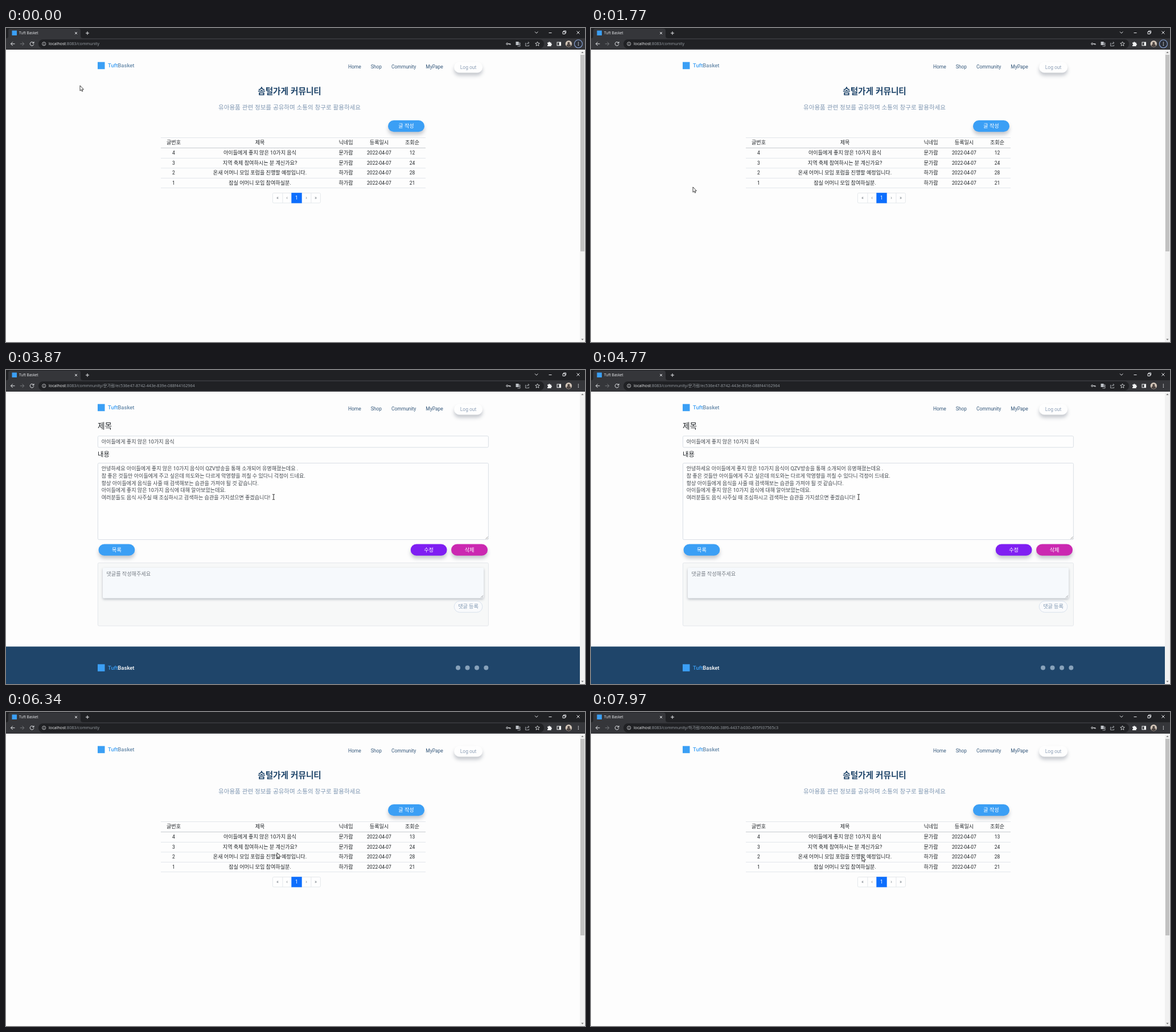
An HTML page that plays this animation: 1017x551 px, repeating every 8 s.

```html
<!DOCTYPE html>
<html lang="ko">
<head>
<meta charset="utf-8">
<style>
html, body { margin: 0; width: 100%; height: 100%; overflow: hidden; background: #fdfdfd; }
svg { display: block; font-family: Roboto, "Noto Sans CJK KR", "Noto Sans CJK", sans-serif; }
.ui { font-family: "Open Sans", "Noto Sans CJK KR", "Noto Sans CJK", sans-serif; }
.kr { font-family: "Noto Sans CJK KR", "Noto Sans CJK", sans-serif; }
.lift { filter: drop-shadow(0 5px 3px rgba(20, 35, 60, .24)); }
.soft { filter: drop-shadow(0 2px 2px rgba(20, 35, 60, .28)); }
.icon { fill: none; stroke: #e8eaed; stroke-width: 1; }
</style>
</head>
<body>
<svg id="stage" width="1017" height="551"></svg>
<script>
const BLUE = '#3b9ff5', INK = '#212529', NAVY = '#1f456a', SLATE = '#7f97b2';

const rect = (x, y, w, h, fill, more = '') =>
  `<rect x="${x}" y="${y}" width="${w}" height="${h}" fill="${fill}" ${more}/>`;
const dot = (x, y, r, fill, more = '') => `<circle cx="${x}" cy="${y}" r="${r}" fill="${fill}" ${more}/>`;
const icon = (d, more = '') => `<path class="icon" d="${d}" ${more}/>`;
// y is the optical middle of the line
const text = (x, y, str, size = 9.1, fill = INK, more = '') =>
  `<text x="${x}" y="${y + size * .36}" font-size="${size}" fill="${fill}" ${more}>${str}</text>`;
const MID = 'text-anchor="middle"';
const mid = (x, y, str, size, fill, more = '') => text(x, y, str, size, fill, MID + ' ' + more);
const pill = (x, y, w, h, fill, label, id = '') =>
  rect(x, y, w, h, fill, `rx="${h / 2}" class="lift" ${id && `id="${id}"`}`) +
  mid(x + w / 2, y + h / 2, label, 9.1, '#fff', 'font-weight="500"');
const field = (x, y, w, h, fill = '#fefefe', more = 'stroke="#d0d7df"') =>
  rect(x, y, w, h, fill, `rx="2" stroke-width=".8" ${more}`);
const grip = (x, y) => icon(`M${x - 4} ${y}l4 -4M${x - 1.5} ${y}l1.5 -1.5`, 'style="stroke:#777;stroke-width:.7"');
const brand = (y, color) => rect(161, y - 6, 12.5, 12.5, BLUE) +
  text(179, y, `<tspan fill="${BLUE}">Tuft</tspan>Basket`, 9.53, color, 'font-weight="500"');

function browser() {
  return rect(0, 0, 1017, 38, '#35363a') + rect(0, 0, 1017, 18, '#202124') +
    '<path d="M1 18Q4 18 4 14V5Q4 1 8 1H127Q131 1 131 5V14Q131 18 135 18Z" fill="#35363a"/>' +
    rect(10.5, 4.5, 8.5, 8.5, BLUE) +
    text(23, 9, 'Tuft Basket', 6.5, '#e8eaed', 'class="ui"') +
    icon('M121 7l4 4m0 -4l-4 4M140 9h6m-3 -3v6') +
    icon('M929 6.5l2.7 2.7 2.7 -2.7M953.5 8.5h5M978 6.5h4v4h-4zM979.5 6.5v-1.5h4v4h-1.5M1002.5 5.5l5 5m0 -5l-5 5', 'stroke-width=".8"') +
    rect(57, 20, 888, 16, '#202124', 'rx="8"') +
    icon('M15.5 27.8h-7m3.3 -3.3l-3.3 3.3 3.3 3.3') +
    icon('M24.8 27.8h7m-3.3 -3.3l3.3 3.3 -3.3 3.3', 'style="stroke:#77797d"') +
    icon('M48 25.6a3.3 3.3 0 1 0 .8 2.7M49 24v2.5h-2.6') +
    icon('M63.6 27.8a3.1 3.1 0 1 0 6.2 0a3.1 3.1 0 1 0 -6.2 0M66.7 27.3v2.3M66.7 25.8v.8', 'style="stroke-width:.75"') +
    '<text class="ui" x="75" y="30.2" font-size="7.2" fill="#9aa0a6"><tspan fill="#f1f3f4">localhost</tspan><tspan id="path"></tspan></text>' +
    dot(880.3, 27.8, 1.5, 'none', 'stroke="#e8eaed"') + icon('M882 27.8h4v1.8m-1.6 -1.8v1.5', 'stroke-width="1.2"') +
    rect(895.5, 24, 5, 6, '#bdc1c6') + icon('M900 26h3v6h-4.5M900.5 28h2m-1 0v2', 'style="stroke:#bdc1c6;stroke-width:.8"') +
    icon('M913.5 26.5h-1v5h6v-2M914.5 29q.5 -3 4 -3m-1.6 -1.8l2 1.8 -2 1.8', 'style="stroke:#bdc1c6;stroke-width:.8"') +
    icon('M933.5 24l1.1 2.6 2.7 .2 -2.1 1.8 .7 2.7 -2.4 -1.5 -2.4 1.5 .7 -2.7 -2.1 -1.8 2.7 -.2z', 'style="stroke-width:.8"') +
    '<path d="M951 25.5h2a1.3 1.3 0 0 1 2.6 0h2v2a1.3 1.3 0 0 1 0 2.6v1.8h-6.6v-2a1.2 1.2 0 0 0 0 -2.4z" fill="#f1f3f4"/>' +
    rect(968, 25, 6.5, 5.8, 'none', 'stroke="#f1f3f4"') + rect(971.5, 25, 3, 6, '#f1f3f4') +
    dot(988.3, 27.8, 5.7, '#d2c5b8') + dot(988.3, 26.5, 2.1, '#4d4542') +
    '<path d="M984.5 31.5a3.8 3.4 0 0 1 7.6 0q-3.8 3.4 -7.6 0z" fill="#4d4542"/>' +
    dot(1005.4, 27.8, 7, '#2b2f38', 'id="ring" stroke="#8aa5d8" stroke-width="1.1"') +
    [25.3, 27.8, 30.3].map(y => dot(1005.4, y, .8, '#f1f3f4')).join('');
}

function header() {
  const nav = [[601, 'Home'], [640.7, 'Shop'], [677, 'Community'], [737.3, 'MyPape']];
  return brand(65.7, '#6a8cab') +
    nav.map(([x, s]) => text(x, 68.3, s, 8.47, '#36597c')).join('') +
    rect(787, 59.5, 50, 19, '#fefefe', 'rx="9.5" class="lift"') +
    mid(812, 69, 'Log out', 8.47, '#8d9fb6');
}

function list() {
  const cols = [294.5, 446, 597, 655.5, 713.5];
  const rows = [
    ['4', '아이들에게 좋지 않은 10가지 음식', '문가람', 12],
    ['3', '지역 축제 참여하시는 분 계신가요?', '문가람', 24],
    ['2', '온새 어머니 모임 포럼을 진행할 예정입니다.', '하가람', 28],
    ['1', '잠실 어머니 모임 참여하실분.', '하가람', 21]
  ];
  const cell = (i, y, s, more) => mid(cols[i], y, s, /[가-힣]/.test(s) ? 9.1 : 8.47, INK, more);
  const pages = [[477, '«'], [493.5, '‹'], [510.3, '1'], [527.5, '›'], [544, '»']];
  return mid(498, 110.5, '솜털가게 커뮤니티', 14.6, NAVY, 'class="kr" font-weight="900"') +
    mid(498, 138.8, '유아용품 관련 정보를 공유하며 소통의 창구로 활용하세요', 10.52, SLATE, 'class="kr"') +
    pill(671, 162, 64, 20.3, BLUE, '글 작성') +
    [192, 210, 228, 245.5, 263, 280.3].map((y, i) =>
      rect(272, y, 465, .8, i === 1 ? '#b9bec5' : '#dce1e8')).join('') +
    ['글번호', '제목', '닉네임', '등록일시', '조회순'].map((s, i) => cell(i, 201, s, 'font-weight="500"')).join('') +
    rows.map(([no, title, who, hits], r) => [no, title, who, '2022-04-07', String(hits)].map((s, i) =>
      cell(i, 219 + r * 17.55, s, r === 0 && i === 4 ? 'id="hits"' : '')).join('')).join('') +
    rect(468.4, 289.6, 84, 17.4, '#fefefe', 'rx="2" stroke="#dee2e6" stroke-width=".8"') +
    [485.5, 535.5].map(x => rect(x, 289.6, .8, 17.4, '#dee2e6')).join('') +
    rect(501.3, 289.2, 18.4, 18.2, '#0d6efd') +
    pages.map(([x, s]) => mid(x, 298.3, s, 8.47, s === '1' ? '#fff' : '#6c757d')).join('') +
    rect(1008, 38, 9, 513, '#f1f1f1') + rect(1009, 47, 7, 345, '#c1c1c1');
}

function post() {
  const lines = [
    '안녕하세요 아이들에게 좋지 않은 10가지 음식이 QZV방송을 통해 소개되어 유명해졌는데요 .',
    '참 좋은 것들만 아이들에게 주고 싶은데 의도와는 다르게 악영향을 끼칠 수 있다니 걱정이 드네요.',
    '항상 아이들에게 음식을 사줄 때 검색해보는 습관을 가져야 될 것 같습니다.',
    '아이들에게 좋지 않은 10가지 음식에 대해 알아보았는데요.',
    '여러분들도 음식 사주실 때 조심하시고 검색하는 습관을 가지셨으면 좋겠습니다!'
  ];
  return text(161, 98, '제목', 13.6) + field(161.4, 115.8, 686, 20) +
    text(167.7, 125.7, '아이들에게 좋지 않은 10가지 음식', 9.1, '#40464c') +
    text(161, 147.5, '내용', 11.3) + field(161.4, 163.4, 686, 134.2) +
    lines.map((s, i) => text(167.7, 172.9 + i * 12.7, s, 9.1, '#40464c')).join('') + grip(846.5, 296.5) +
    pill(162.5, 305.5, 63.8, 20.3, BLUE, '목록', 'back') +
    pill(710.7, 305.5, 63.8, 20.3, '#7f1ff2', '수정') +
    pill(782, 305.5, 64, 20.3, '#cb28b1', '삭제') +
    field(161.4, 338.4, 686, 110.6, '#f7f8f8', 'stroke="#dde1e6"') +
    rect(170, 347, 669, 53.5, '#f6f9fc', 'rx="2" class="soft"') +
    text(176.5, 358, '댓글를 작성해주세요', 9.1, '#757c84') + grip(838, 399.5) +
    rect(787.2, 405.4, 49.6, 19.8, '#f9fafc', 'rx="9.9" stroke="#d0dbe9" stroke-width=".8"') +
    mid(812, 415.2, '댓글 등록', 9.1, SLATE) +
    rect(0, 485.3, 1008, 66, NAVY) + brand(522.3, '#fff') +
    [794, 810.5, 827, 843.3].map(x => dot(x, 522.5, 4, '#88a2ba')).join('') +
    rect(1008, 38, 9, 513, '#f1f1f1');
}

const ARROWS = '<path d="M1010.3 44l2.2 -2.4 2.2 2.4zM1010.3 545.5l2.2 2.4 2.2 -2.4z" fill="#777"/>';
stage.innerHTML = rect(0, 0, 1017, 551, '#fdfdfd') + browser() +
  `<g id="listPage">${list()}</g><g id="postPage">${post()}</g>` + header() + ARROWS +
  `<g id="cursor">
    <path id="arrow" d="M0 0V9.2L2.1 7.3 3.5 10.3 4.9 9.7 3.6 6.8H6.4Z" fill="#fff" stroke="#111" stroke-width=".8"/>
    <path id="beam" d="M-2 -4.5H-.6L0 -4 .6 -4.5H2M0 -4V4M-2 4.5H-.6L0 4 .6 4.5H2" fill="none" stroke="#111" stroke-width=".9"/>
  </g>`;

const $ = id => document.getElementById(id);
const show = (id, on) => $(id).setAttribute('display', on ? 'inline' : 'none');

// time, x, y of the pointer
const TRACK = [
  [0, 130, 101], [500, 130, 101], [1500, 179, 279], [1900, 179, 279], [2550, 390, 255],
  [3070, 461, 227], [3300, 470, 222.8], [4800, 470, 222.8], [5500, 210, 318], [5860, 210, 318],
  [6300, 476, 247], [6900, 476, 247], [7400, 476, 253], [8000, 476, 253]
];
function pointer(t) {
  const i = TRACK.findIndex(k => k[0] > t);
  const [a, b] = [TRACK[i - 1], TRACK[i]];
  const u = (t - a[0]) / (b[0] - a[0]), e = u * u * (3 - 2 * u);
  return [a[1] + (b[1] - a[1]) * e, a[2] + (b[2] - a[2]) * e];
}
const inside = (x, y, l, t, r, b) => x > l && x < r && y > t && y < b;

function draw(now) {
  const t = now % 8000, [x, y] = pointer(t);
  const reading = t >= 3430 && t < 5760;
  const typing = reading && inside(x, y, 161, 163, 848, 298);
  show('listPage', !reading);
  show('postPage', reading);
  show('ring', t < 3370);
  show('beam', typing);
  show('arrow', !typing);
  $('cursor').setAttribute('transform', `translate(${x} ${y})`);
  $('back').setAttribute('fill', inside(x, y, 162, 305, 227, 326) ? '#65b4f8' : BLUE);
  $('hits').textContent = t < 5700 ? '12' : '13';
  $('path').textContent = ':8083/' + (
    t >= 7940 ? 'commnunity/하가람/0b50fa66-38f6-4437-b030-495f937565c3' :
    t >= 3370 && t < 5730 ? 'commnunity/문가람/ec536e47-8742-443e-839e-088f44162964' : 'community');
  requestAnimationFrame(draw);
}
requestAnimationFrame(draw);
</script>
</body>
</html>
```
